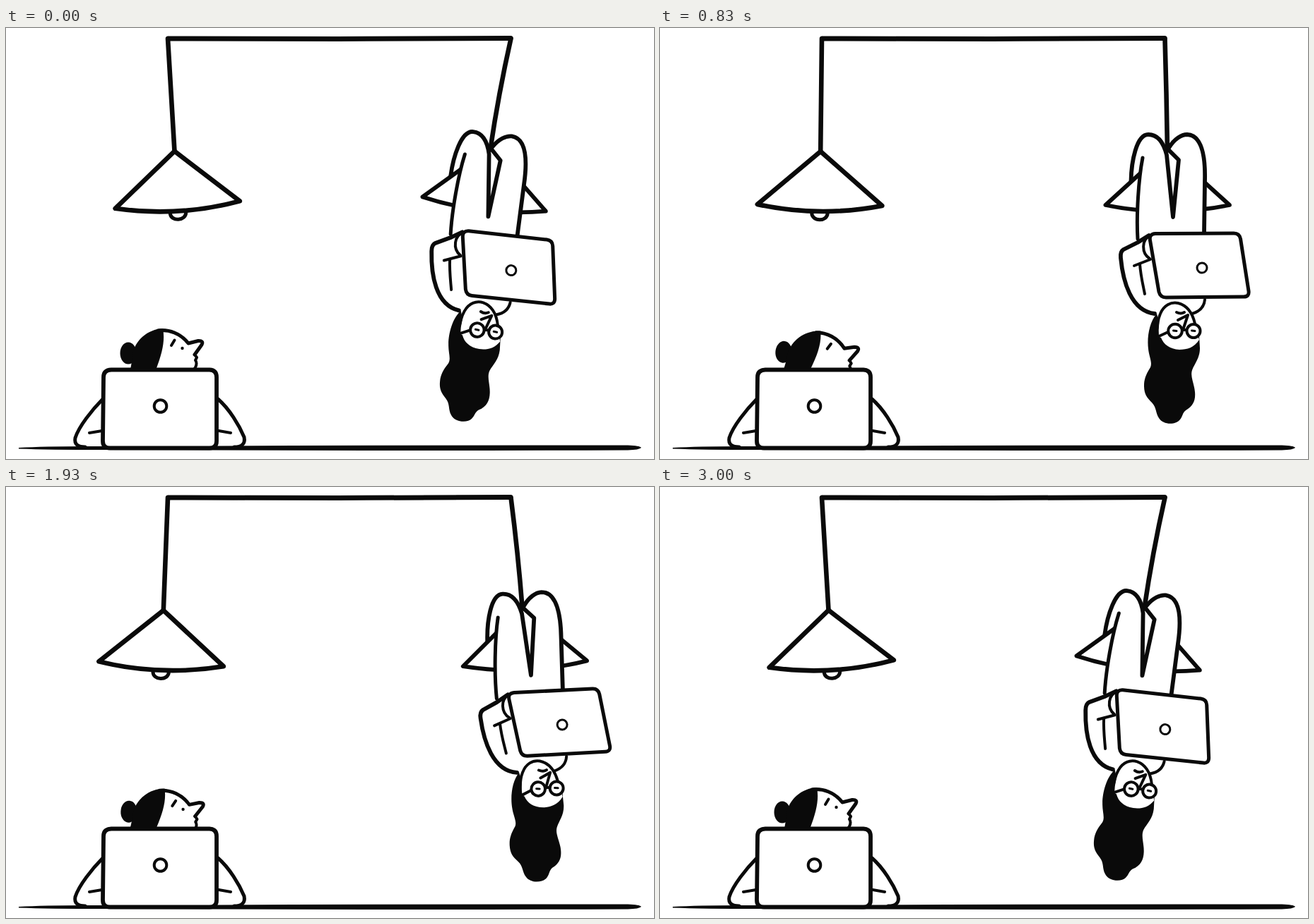
An HTML page for the animation above (3030 ms loop, 917 by 611 pixels).

```html
<!DOCTYPE html>
<html lang="en">
<head>
<meta charset="utf-8">
<title>Upside-down office</title>
<style>
  html, body { margin: 0; width: 100%; height: 100%; overflow: hidden; background: #fff; }
  svg { display: block; width: 100%; height: 100%; }
  .ink { fill: none; stroke: #0a0a0a; stroke-width: 5; stroke-linecap: round; stroke-linejoin: round; }
  .paper { fill: #fff; }
  .solid { fill: #0a0a0a; stroke: none; }
  .bold { stroke-width: 7; }
  .cord { stroke-width: 6.6; }
  .mid { stroke-width: 5.8; }
  .fine { stroke-width: 4; }
  .thin { stroke-width: 3; }
  .bare { fill: #fff; stroke: none; }
</style>
</head>
<body>
<svg viewBox="0 0 917 611">
  <defs>
    <clipPath id="aboveDesk"><rect width="917" height="483"/></clipPath>
  </defs>

  <g class="ink">
    <!-- left lamp -->
    <g id="lamp">
      <path class="cord" d="M229 15V175"/>
      <path class="paper" d="M217.500 262C217.500 275 240 275 240 262"/>
      <path class="paper cord" d="M229 175L140.500 251Q229 269 317 251Z"/>
    </g>

    <!-- hanging woman -->
    <path id="cord" class="cord"/>
    <g id="woman">
      <path class="paper mid" d="M718 171L630.500 251Q718 269 806 251Z"/>

      <path class="bare" d="M675 302C675 265 676 215 683 183L677 172Q681 151 691 151C706 151 713 164 717 180L726 268L722 302Z"/>
      <path class="bare" d="M722 302L726 268L734 186L720 170C728 157 738 151 746 151C768 152 772 185 771 218L770 300Z"/>
      <path class="mid" d="M666.500 217C667 190 674 151 691 151C706 151 713 164 717 180L726 268L734 187L718 171"/>
      <path class="mid" d="M720 170C728 157 738 151 746 151C768 152 772 185 771 218L770 290"/>
      <path d="M683 184C677 215 674 265 676 299"/>

      <path class="mid" d="M692 294L676 304L656 314Q651 317 652 326C655 358 666 401 700 405"/>
      <path class="fine" d="M694 294C681 300 681 319 693 327M671 337L694 328M679 334C680 350 683 362 686 377"/>
      <path class="fine" d="M771 385C770 396 763 402 753 405"/>

      <path class="solid" d="M703 405C692 417 689 440 691 455C692 466 697 474 694 481C687 492 685 499 685 507C685 519 689 524 696 531C703 538 701 546 706 553C712 563 730 563 736 555C740 550 739 546 744 542C755 536 758 527 757 516C756 504 750 494 753 485C757 475 764 468 764 454L763 437L710 430Z"/>
      <path class="bare" d="M708 405C713 393 723 388 733 390C746 394 755 405 757 420L763 442C756 453 746 456 735 456C721 455 713 449 709 439L704 437Z"/>
      <path class="fine" d="M704 437C703 424 704 414 708 405C713 393 723 388 733 390C745 393 753 402 757 419"/>
      <path class="fine" d="M731 403Q737 406 742 403M733 414L747 407L741 425"/>
      <path class="fine" d="M738 428H745M719 431L706 437"/>
      <circle class="paper fine" cx="729" cy="429.500" r="9.800"/>
      <circle class="paper fine" cx="755" cy="429.500" r="9.500"/>
      <path class="thin" d="M726.500 429L731 429.500M752.500 429L757 429.500"/>

      <path class="paper" d="M701 291.500L812 291Q820 291 821.500 299L833 373Q834 381 826 381L716 382Q708 382 706 374L693.500 301Q692 292 701 291.500Z"/>
      <circle class="thin" cx="767" cy="340" r="7"/>
    </g>

    <!-- ceiling and desk -->
    <path class="bold" d="M230 15L470 15.500L714 14.500"/>
    <path class="solid" d="M18 595Q60 592.500 140 593L300 592.500Q600 591 880 591.500Q897 592 899 595Q896 598 880 598.500Q600 599.500 300 598.500L140 598Q60 598 18 596.500Z"/>

    <!-- seated colleague -->
    <g clip-path="url(#aboveDesk)">
      <g id="head">
        <ellipse class="solid" cx="173" cy="461" rx="11.500" ry="15.500"/>
        <path class="solid" d="M172 500C177 482 178 474 179 462C183 443 200 427 222 426C226 447 219 468 206 500Z"/>
        <path d="M215 429C231 427 247 433 258 447L272 443.500Q280 443 277 449L267 463"/>
        <path class="fine" d="M267 463L270 467L268 471Q271 475 268 481L262 490"/>
        <path class="fine" d="M238.500 442.500L234 450"/>
        <circle id="eye" class="solid" cx="249.500" cy="454" r="2.200"/>
      </g>
    </g>
    <path d="M137 526C122 541 103 565 98 581C96 591 103 594 112 594"/>
    <path d="M300 526C316 540 330 563 337 580C339 590 333 594 323 594"/>
    <path class="fine" d="M118 574L136 571M301 571L318 574"/>
    <path class="paper mid" d="M149 484.500H288Q298 485 298 495V585.500Q298 595.500 288 595.500H147Q137 595.500 137 585.500L138 495Q138 485 149 484.500Z"/>
    <circle class="fine" cx="218.500" cy="536" r="8.800"/>
  </g>
</svg>
<script>
const LOOP = 3030, HALF = 1500, FRAMES = 90;
const LAMP_TILT = 3.4;
const BODY_TILT = 5.55, BODY_REST = -0.19, PIVOT = [710, -110];
const HOOK = [718, 172], CEILING = [714.5, 15];
const HEAD_TILT = 6;

const [lamp, woman, cord, head, eye] =
  ['lamp', 'woman', 'cord', 'head', 'eye'].map(id => document.getElementById(id));

const smooth = (from, to, t) => {
  const p = Math.min(1, Math.max(0, (t - from) / (to - from)));
  return p * p * (3 - 2 * p);
};

// cubic-bezier(.42, 0, .58, 1), solved by bisection
function easeInOut(x) {
  let lo = 0, hi = 1, u = 0.5;
  for (let i = 0; i < 24; i++) {
    u = (lo + hi) / 2;
    const v = 1 - u;
    if (1.26 * u * v * v + 1.74 * u * u * v + u * u * u < x) lo = u;
    else hi = u;
  }
  return u * u * (3 - 2 * u);
}

const turn = (el, deg, [x, y]) => el.setAttribute('transform', `rotate(${deg} ${x} ${y})`);

function rotated([x, y], deg, [px, py]) {
  const a = deg * Math.PI / 180, c = Math.cos(a), s = Math.sin(a);
  return [px + (x - px) * c - (y - py) * s, py + (x - px) * s + (y - py) * c];
}

// thirty pictures a second, held for 30, 40 and 30 ms in turn
function stepTime(ms) {
  const rest = ms % 100;
  const step = 3 * Math.floor(ms / 100) + (rest >= 30) + (rest >= 70);
  return (step % FRAMES) * 100 / 3;
}

function draw(t) {
  const sway = 1 - 2 * easeInOut(1 - Math.abs(t / HALF - 1));
  turn(lamp, -LAMP_TILT * sway, [229, 15]);

  const lean = BODY_TILT * (sway - BODY_REST);
  turn(woman, lean, PIVOT);
  const [hx, hy] = rotated(HOOK, lean, PIVOT);
  const bend = (CEILING[0] + hx) / 2 - 3 * sway;
  cord.setAttribute('d', `M${CEILING}Q${bend} ${(CEILING[1] + hy) / 2} ${hx} ${hy}`);

  const nod = smooth(0, 740, t) - smooth(1630, 2210, t);
  turn(head, HEAD_TILT * nod, [190, 478]);
  eye.style.visibility = t > 765 && t < 900 ? 'hidden' : 'visible';
}

const start = performance.now();
function tick() {
  draw(stepTime((performance.now() - start) % LOOP));
  requestAnimationFrame(tick);
}
tick();
</script>
</body>
</html>
```
